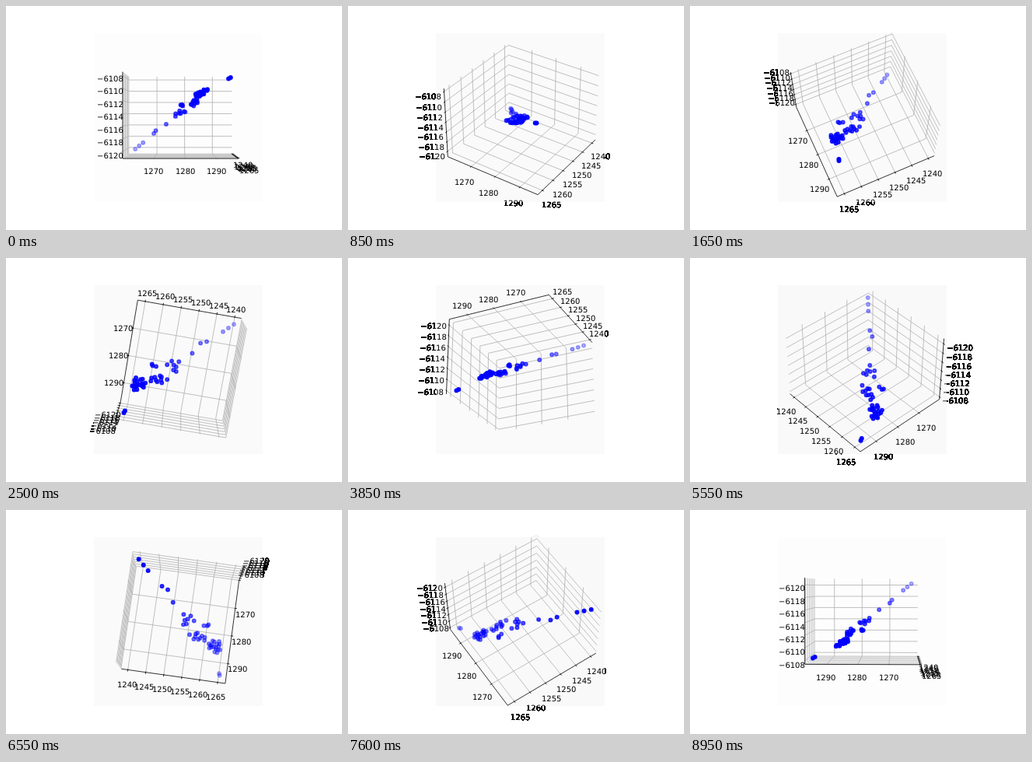
Recreate the animation shown at these times as an HTML page with a canvas. Size 432 by 288 pixels, loop 9000 ms.

```html
<!DOCTYPE html>
<html lang="en">
<head>
<meta charset="utf-8">
<title>Rotating 3D scatter</title>
<style>
  html, body { margin: 0; width: 100%; height: 100%; overflow: hidden; background: #fff; }
  canvas { display: block; }
</style>
</head>
<body>
<canvas id="stage" width="432" height="288"></canvas>
<script>
const W = 432, H = 288, STEP = 50, STEPS = 180;
const view = { x: 112.68, y: 34.56, size: 217.44 };
const DIST = 10, ZOOM = view.size * DIST / 1.85;
const CX = view.x + view.size * 0.95 / 1.85;
const CY = view.y + view.size * 0.90 / 1.85;

const ctx = document.getElementById('stage').getContext('2d', { willReadFrequently: true });

// near: the axis whose near side carries the line; shade: pane darkness
const axes = [
  { mid: 1252.63, range: 27.8, side: 1.14287, from: 1240, to: 1265, step: 5, near: 1, tickDir: 1, shade: 6.4 },
  { mid: 1278.5, range: 35.6, side: 1.14287, from: 1270, to: 1290, step: 10, near: 0, tickDir: 0, shade: 12.75 },
  { mid: -6114.26, range: 13.15, side: 0.85715, from: -6120, to: -6108, step: 2, near: 0, tickDir: 0, shade: 9.56 }
];
for (const axis of axes) {
  axis.delta = axis.side / 12;
  axis.half = axis.side / 2 + axis.delta / 4;
  axis.labelGap = axis.delta * 11.5 * 48 / (2 * view.size);
  axis.marks = [];
  for (let value = axis.from; value <= axis.to; value += axis.step) {
    axis.marks.push({
      at: (value - axis.mid) / axis.range * axis.side,
      text: String(value).replace('-', '\u2212')
    });
  }
}

let seed = 7;
const random = () => (seed = seed * 16807 % 2147483647) / 2147483647;

// Points spread evenly over an ellipse, with some jitter.
function cluster(count, a, b, radiusA, radiusB) {
  return Array.from({ length: count }, (_, n) => {
    const r = Math.sqrt((n + random()) / count), angle = n * 2.4 + random();
    return [a + radiusA * r * Math.cos(angle), b + radiusB * r * Math.sin(angle)];
  });
}

// A loose trail and a few clusters, all lying on one tilted plane.
const points = [
  [-0.52, -0.52], [-0.464, -0.473], [-0.409, -0.426],
  [-0.243, -0.299], [-0.177, -0.275], [-0.104, -0.158],
  [0.51, 0.499], [0.518, 0.52],
  ...cluster(7, 0.077, -0.014, 0.08, 0.075),
  ...cluster(3, 0.29, 0.015, 0.045, 0.015),
  ...cluster(10, 0.22, 0.15, 0.1, 0.045),
  ...cluster(18, 0.42, 0.217, 0.075, 0.075)
].map(([a, b]) => [a, b, 0.34 * a + 0.41 * b]);

const dot = (a, b) => a[0] * b[0] + a[1] * b[1] + a[2] * b[2];
const withAt = (p, i, value) => p.map((v, k) => k === i ? value : v);

// Elevation and azimuth share one angle; past 90 degrees the up vector points down.
function makeCamera(degrees) {
  const angle = degrees * Math.PI / 180;
  const c = Math.cos(angle), s = Math.sin(angle);
  const flip = degrees > 90 ? -Math.sign(c) : 1;
  const eye = [c * c, s * c, s];
  const right = [-s * flip, c * flip, 0];
  const up = [-c * s * flip, -s * s * flip, c * flip];
  const project = p => {
    const depth = DIST - dot(eye, p), k = ZOOM / depth;
    return [CX + k * dot(right, p), CY - k * dot(up, p), depth];
  };
  return { eye, project };
}

function tracePath(pts) {
  ctx.beginPath();
  pts.forEach(([x, y]) => ctx.lineTo(x, y));
}

function strokeLine(pts, color) {
  tracePath(pts);
  ctx.strokeStyle = color;
  ctx.stroke();
}

function polygonArea(pts) {
  return Math.abs(pts.reduce((sum, [x, y], i) => {
    const [nx, ny] = pts[(i + 1) % pts.length];
    return sum + x * ny - nx * y;
  }, 0)) / 2;
}

// The backdrop takes one flat tone, averaged over the three far panes.
function drawBackdrop(far, project) {
  let dark = 0;
  axes.forEach((axis, i) => {
    const j = (i + 1) % 3, k = (i + 2) % 3;
    const pane = [[1, 1], [1, -1], [-1, -1], [-1, 1]].map(([a, b]) =>
      project(withAt(withAt(far, j, a * far[j]), k, b * far[k])));
    dark += polygonArea(pane) * axis.shade;
    tracePath(pane);
    ctx.fillStyle = '#f4f4f4';
    ctx.fill();
  });
  const tone = Math.round(255 - dark / view.size ** 2);
  ctx.fillStyle = `rgb(${tone},${tone},${tone})`;
  ctx.fillRect(113, 35, 217, 217);
}

function drawAxis(axis, i, far, project) {
  const j = (i + 1) % 3, k = (i + 2) % 3;
  for (const { at } of axis.marks) {
    const corner = withAt(far, i, at);
    strokeLine([withAt(corner, j, -far[j]), corner, withAt(corner, k, -far[k])].map(project), '#b0b0b0');
  }

  const edge = withAt(far, axis.near, -far[axis.near]);
  strokeLine([edge, withAt(edge, i, -edge[i])].map(project), '#000');

  const dir = axis.tickDir, outward = Math.sign(edge[dir]) * axes[dir].delta;
  ctx.fillStyle = '#000';
  for (const { at, text } of axis.marks) {
    const foot = withAt(edge, i, at);
    strokeLine([0.2, -0.1].map(f => project(withAt(foot, dir, foot[dir] + f * outward))), '#000');
    const [x, y] = project(foot.map((v, n) => n === i ? v : v + Math.sign(v) * axes[n].labelGap));
    ctx.fillText(text, Math.round(x - ctx.measureText(text).width / 2), Math.round(y + 8));
  }
}

function drawPoints(project) {
  const dots = points.map(project).sort((a, b) => b[2] - a[2]);
  const haze = d => -1 / d[2];
  const farthest = haze(dots[0]), nearest = haze(dots[dots.length - 1]);
  ctx.lineWidth = 1.5;
  for (const d of dots) {
    const alpha = 1 - 0.7 * (haze(d) - nearest) / (farthest - nearest);
    ctx.fillStyle = ctx.strokeStyle = `rgba(0,0,255,${alpha})`;
    ctx.beginPath();
    ctx.arc(d[0], d[1], Math.sqrt(20) / 2, 0, 2 * Math.PI);
    ctx.fill();
    ctx.stroke();
  }
}

// Outside the backdrop, soft edges become solid pixels.
function hardenEdges() {
  const image = ctx.getImageData(0, 0, W, H), data = image.data;
  for (let n = 3; n < data.length; n += 4) data[n] = data[n] > 8 ? 255 : 0;
  ctx.putImageData(image, 0, 0);
}

function draw(step) {
  const { eye, project } = makeCamera(step * 2);
  const far = axes.map((axis, i) => eye[i] < -1e-9 ? axis.half : -axis.half);
  ctx.clearRect(0, 0, W, H);
  ctx.font = '10px "DejaVu Sans", sans-serif';
  ctx.textRendering = 'geometricPrecision';
  ctx.lineWidth = 0.8;
  drawBackdrop(far, project);
  axes.forEach((axis, i) => drawAxis(axis, i, far, project));
  drawPoints(project);
  hardenEdges();
}

const start = performance.now();
let shown = -1;
function tick() {
  const step = Math.floor((performance.now() - start) / STEP) % STEPS;
  if (step !== shown) draw(shown = step);
  requestAnimationFrame(tick);
}
tick();
</script>
</body>
</html>
```
